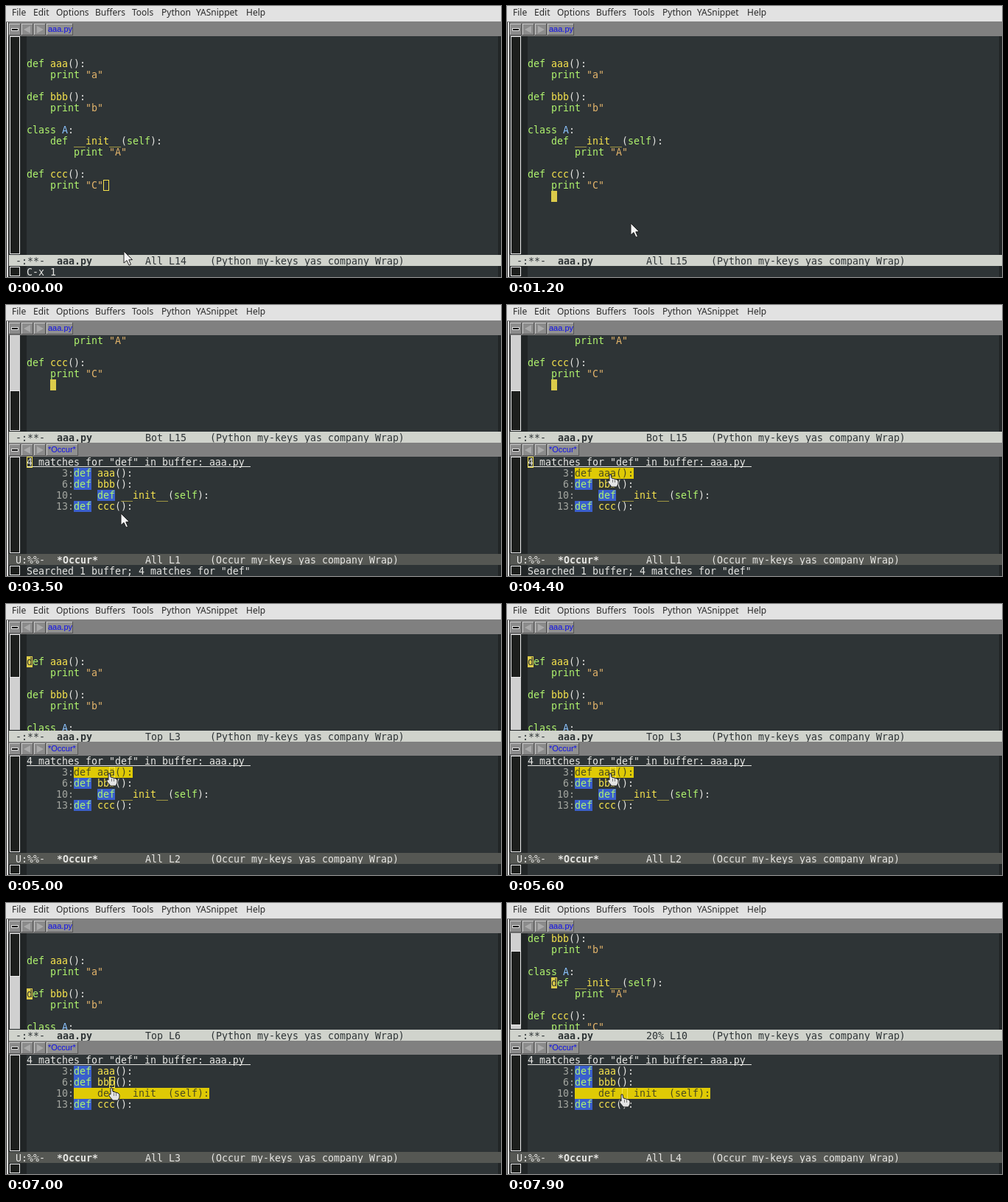
Animation of 672x368 px, one loop 8000 ms. Source, as an HTML page with a canvas:

```html
<!DOCTYPE html>
<html lang="en">
<head>
<meta charset="utf-8">
<title>Occur in an editor</title>
<style>
  html, body { margin: 0; width: 672px; height: 368px; overflow: hidden; background: #2e3436; }
  canvas { display: block; }
</style>
</head>
<body>
<canvas id="stage" width="672" height="368"></canvas>
<script>
const ctx = document.getElementById('stage').getContext('2d');
const LOOP = 8000, STEP = 100;
const LEFT = 28, CELL = 8, ROW = 15, HEAD = 19;
const TOP = 22, SPLIT = 187, ECHO = 353;
const MONO = '13.29px "DejaVu Sans Mono", monospace';
const MENU = '12px "Noto Sans", "Open Sans", sans-serif';
const TAB = '11px "Liberation Sans", sans-serif';

const C = {
  back: '#2e3436', fringe: '#212526', text: '#e6e6e3', keyword: '#b0f46e',
  string: '#e3b46b', name: '#f6e34d', type: '#8cc4ff', number: '#a3a6a0',
  cursor: '#dccb4a', hover: '#dfca05', match: '#3a5fcd',
  active: '#d0d3cc', idle: '#555753', menu: '#e2e2e2', head: '#808080'
};

const SOURCE = ['', '', 'def aaa():', '    print "a"', '', 'def bbb():', '    print "b"', '',
  'class A:', '    def __init__(self):', '        print "A"', '', 'def ccc():', '    print "C"', ''];
const MATCHES = [3, 6, 10, 13];
const PROMPT = 'List lines matching regexp (default def): ';

// Event times in ms
const T = { clear: 700, newline: 900, prompt: 1500, keys: [1900, 2200, 2500], enter: 2800,
  clicks: [5000, 6500, 7600] };

// time, x, y of the pointer's hot spot
const PATH = [[0, 160, 333], [500, 160, 333], [1200, 168, 295], [2900, 167, 290], [3500, 156, 283],
  [4200, 140, 230], [5600, 140, 230], [6300, 142, 242], [6700, 142, 243], [7000, 143, 251],
  [7500, 156, 260], [8000, 156, 260]];

const ARROW = [[0, 0], [0, 16], [4, 12.5], [7, 19], [9.5, 18], [6.8, 11.7], [11.5, 11.5]];
const HAND = [[-1, 0], [1, 0], [2, 5], [9, 7], [11, 9], [11, 13], [9, 17], [2, 17], [-3, 11],
  [-3, 8], [-1, 9]];

function rect(x, y, w, h, color) {
  ctx.fillStyle = color;
  ctx.fillRect(x, y, w, h);
}

function frame(x, y, w, h, color) {
  ctx.strokeStyle = color;
  ctx.lineWidth = 1;
  ctx.strokeRect(x + .5, y + .5, w - 1, h - 1);
}

function polygon(points, x, y, fill, stroke) {
  ctx.beginPath();
  points.forEach(([px, py]) => ctx.lineTo(x + px, y + py));
  ctx.closePath();
  ctx.fillStyle = fill;
  ctx.fill();
  if (stroke) {
    ctx.strokeStyle = stroke;
    ctx.lineWidth = 1;
    ctx.stroke();
  }
}

function write(text, x, base, color, font = MONO) {
  ctx.font = font;
  ctx.fillStyle = color;
  ctx.fillText(text, x, base);
}

function writeCode(line, x, base) {
  const token = /(\b(?:def|class|print|self)\b)|("[^"]*")|(\w+(?=\())|(\bA\b)|[^\s\w"]+/g;
  for (const m of line.matchAll(token)) {
    const color = m[1] ? C.keyword : m[2] ? C.string : m[3] ? C.name : m[4] ? C.type : C.text;
    write(m[0], x + m.index * CELL, base, color);
  }
}

function boxCursor(col, top, solid, char = '') {
  const x = LEFT + col * CELL;
  if (!solid) return frame(x, top, CELL, ROW, C.name);
  rect(x, top, CELL, ROW, C.cursor);
  write(char, x, top + 12, C.back);
}

function drawMenu(inPrompt) {
  rect(0, 0, 672, 21, C.menu);
  rect(0, 21, 672, 1, C.head);
  const items = [['File', 8], ['Edit', 37], ['Options', 68], ['Buffers', 121], ['Tools', 171]];
  if (inPrompt) items.push(['Minibuf', 211], ['Help', 263]);
  else items.push(['Python', 211], ['YASnippet', 258], ['Help', 326]);
  for (const [label, x] of items) write(label, x, 13, '#2b2b2b', MENU);
}

function bevel(x, y, w, h, fill) {
  rect(x, y, w, h, '#555');
  rect(x, y, w - 1, h - 1, '#c6c6c6');
  rect(x + 1, y + 1, w - 2, h - 2, fill);
}

function drawTabs(top, label, width) {
  rect(4, top, 668, HEAD, C.head);
  for (const x of [4, 21, 38]) bevel(x, top + 2, 16, 16, '#8b8b8b');
  rect(7, top + 8, 10, 4, '#ddd');
  rect(8, top + 9, 8, 2, '#111');
  polygon([[0, 5], [9, 0], [9, 10]], 24, top + 5, '#aaa');
  polygon([[9, 5], [0, 0], [0, 10]], 42, top + 5, '#aaa');
  bevel(55, top + 2, width, 16, '#909090');
  write(label, 57, top + 13, '#1010e8', TAB);
}

function drawScroll(top, bottom, from, to) {
  rect(5, top, 14, bottom - top, '#d0d0d0');
  rect(5, from, 14, to - from, '#1d1f1d');
  frame(5, from, 14, to - from, '#f0f0f0');
}

function drawModeline(top, active, file, place, mode) {
  rect(4, top, 668, ROW, active ? C.active : C.idle);
  const color = active ? C.back : C.text, base = top + 13;
  write(active ? '-:**-' : 'U:%%-', 13, base, color);
  write(file, 69, base, color, 'bold ' + MONO);
  write(place, 189, base, color);
  write(`(${mode} my-keys yas company Wrap)`, 277, base, color);
}

function drawBody(top, bottom) {
  rect(4, top, 668, bottom - top, C.fringe);
  rect(LEFT, top, 640, bottom - top, C.back);
}

function drawSource(view) {
  const { start, line, col, solid } = view;
  const top = TOP + HEAD, bottom = view.end - ROW;
  drawBody(top, bottom);
  drawScroll(top, bottom - 1, view.thumb[0], view.thumb[1]);
  ctx.save();
  ctx.beginPath();
  ctx.rect(LEFT, top, 640, bottom - top);
  ctx.clip();
  SOURCE.slice(start - 1).forEach((text, i) => writeCode(text, LEFT, top + 12 + i * ROW));
  boxCursor(col, top + (line - start) * ROW, solid, SOURCE[line - 1][col]);
  ctx.restore();
  drawTabs(TOP, 'aaa.py', 36);
  drawModeline(bottom, true, 'aaa.py', `${view.part} L${line}`, 'Python');
}

function drawOccur(hover, clicks) {
  const first = SPLIT + HEAD, bottom = ECHO - ROW;
  drawBody(first, bottom);
  drawScroll(first, bottom - 1, first, bottom - 1);
  write('4 matches for "def" in buffer: aaa.py', LEFT, first + 12, C.text);
  rect(LEFT, first + 13, 38 * CELL, 1, C.text);
  MATCHES.forEach((n, i) => {
    const top = first + (i + 1) * ROW, x = LEFT + 8 * CELL, line = SOURCE[n - 1];
    write(`${n}:`.padStart(8), LEFT, top + 12, C.number);
    if (hover === i + 1) {
      rect(x, top, line.length * CELL, ROW, C.hover);
      write(line.replace(/_/g, ' '), x, top + 12, '#4a4a20');
    } else {
      rect(x + line.indexOf('def') * CELL, top, 3 * CELL, ROW, C.match);
      writeCode(line, x, top + 12);
    }
  });
  boxCursor([0, 14, 14, 16][clicks], first + clicks * ROW, false);
  drawTabs(SPLIT, '*Occur*', 43);
  drawModeline(bottom, false, '*Occur*', `All L${clicks + 1}`, 'Occur');
}

function drawEcho(t, inPrompt, clicks) {
  const base = ECHO + 13;
  drawBody(ECHO, 368);
  drawScroll(ECHO + 1, 367, ECHO + 1, 367);
  if (inPrompt) {
    const typed = 'def'.slice(0, T.keys.filter(k => t >= k).length);
    write(PROMPT, LEFT, base, C.keyword);
    write(typed, LEFT + PROMPT.length * CELL, base, C.text);
    boxCursor(PROMPT.length + typed.length, ECHO + 1, true);
  } else if (t < T.clear) {
    write('C-x 1', LEFT, base, C.text);
  } else if (t >= T.enter && !clicks) {
    write('Searched 1 buffer; 4 matches for "def"', LEFT, base, C.text);
  }
}

function pointerAt(t) {
  const i = PATH.findIndex(p => p[0] > t);
  const [a, b] = [PATH[i - 1], PATH[i]];
  const u = (t - a[0]) / (b[0] - a[0]), e = u * u * (3 - 2 * u);
  return [1, 2].map(k => Math.round(a[k] + (b[k] - a[k]) * e));
}

function sourceView(t, split, clicks) {
  if (!split) {
    const added = t >= T.newline;
    return { end: ECHO, start: 1, line: added ? 15 : 14, col: added ? 4 : 13, part: 'All',
      thumb: [41, 337], solid: t >= T.clear && t < T.prompt };
  }
  const view = { end: SPLIT, solid: true, col: 0, start: 1, part: 'Top', thumb: [41, 100] };
  if (clicks === 0) Object.assign(view, { start: 11, line: 15, col: 4, part: 'Bot', thumb: [116, 171] });
  else view.line = MATCHES[clicks - 1];
  if (clicks === 3) Object.assign(view, { start: 6, col: 4, part: '20%', thumb: [65, 166] });
  return view;
}

function draw(t) {
  const split = t >= T.enter;
  const inPrompt = t >= T.prompt && !split;
  const clicks = T.clicks.filter(c => t >= c).length;
  const [x, y] = pointerAt(t);
  const row = Math.floor((y - SPLIT - HEAD) / ROW);
  const hover = split && row >= 1 && row <= 4 ? row : 0;

  drawMenu(inPrompt);
  drawSource(sourceView(t, split, clicks));
  if (split) drawOccur(hover, clicks);
  drawEcho(t, inPrompt, clicks);
  rect(0, TOP, 4, 368 - TOP, '#333');
  rect(1, TOP, 2, 368 - TOP, '#dedede');

  if (inPrompt) return;
  if (hover) {
    polygon(HAND, x, y, '#e4e4e4', '#222');
    for (const dx of [3, 6]) rect(x + dx, y + 7, 1, 4, '#777');
  } else {
    polygon(ARROW, x, y, '#f4f4f4', '#222');
  }
}

const begin = performance.now();
function tick() {
  const t = (performance.now() - begin) % LOOP;
  draw(Math.floor(t / STEP) * STEP);
  requestAnimationFrame(tick);
}
tick();
</script>
</body>
</html>
```
